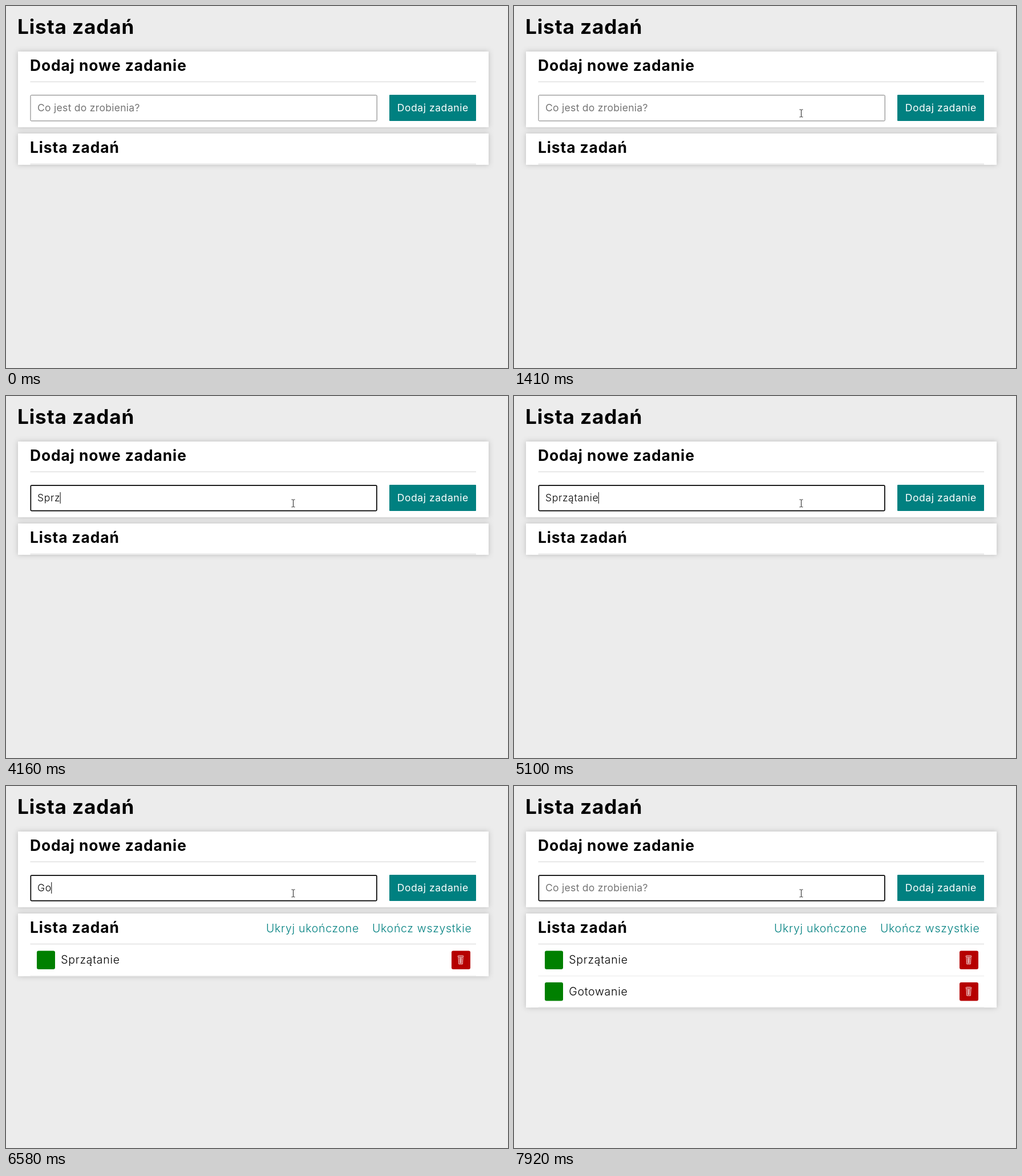
Recreate the animation shown at these times as an HTML page. Size 880 by 636 pixels, loop 8 s.

```html
<!DOCTYPE html>
<html lang="pl">
<head>
<meta charset="utf-8">
<title>Lista zadań</title>
<style>
html, body { margin: 0; width: 100%; height: 100%; overflow: hidden; background: #ececec; }
svg { display: block; width: 880px; height: 636px; }
text { font: 300 19.5px Montserrat, Inter, sans-serif; letter-spacing: .036em; white-space: pre; }
.h1 { font-size: 35.2px; font-weight: 700; letter-spacing: .024em; }
.h2 { font-size: 26.4px; font-weight: 700; letter-spacing: .034em; }
.field { font-size: 17.6px; }
.hint { fill: #757575; font-weight: 400; letter-spacing: .014em; }
.button { fill: #fff; font-weight: 400; letter-spacing: .03em; }
.link { fill: teal; }
.card { fill: #fff; filter: drop-shadow(0 0 5px #bbb); }
.rule { fill: #e9e9e9; }
</style>
</head>
<body>
<svg viewBox="0 0 880 636">
  <defs>
    <g id="row">
      <rect x="54" y="289.5" width="32" height="32.5" rx="3" fill="green"/>
      <rect x="781" y="289.5" width="33" height="32.5" rx="3" fill="#b60000"/>
      <g fill="none" stroke="#fff" stroke-width=".9">
        <rect x="792.2" y="298" width="9.6" height="2.4" rx="1.2"/>
        <path d="M793 300.5l.8 12.3h6.4l.8 -12.3M795.6 301.5l.3 10M797 301.5v10M798.4 301.5l-.3 10"/>
      </g>
    </g>
  </defs>

  <text class="h1" x="20" y="49">Lista zadań</text>

  <rect class="card" x="21" y="80" width="825" height="133"/>
  <rect id="listCard" class="card" x="21" y="224" width="825" height="55"/>

  <text class="h2" x="42" y="114">Dodaj nowe zadanie</text>
  <rect class="rule" x="42.5" y="132" width="781.5" height="2.2"/>
  <rect id="box" fill="#fff"/>
  <text id="typed" class="field" x="55" y="185"></text>
  <text id="hint" class="field hint" x="55" y="185">Co jest do zrobienia?</text>
  <rect id="caret" y="169" width="1" height="20"/>
  <rect x="672" y="156" width="152" height="46" rx="1" fill="teal"/>
  <text class="field button" x="685.7" y="185">Dodaj zadanie</text>

  <text class="h2" x="42" y="258">Lista zadań</text>
  <rect class="rule" x="42.5" y="276.5" width="781.5" height="2.2"/>
  <g id="first">
    <text class="link" x="456" y="256.5">Ukryj ukończone</text>
    <text class="link" x="642" y="256.5">Ukończ wszystkie</text>
    <use href="#row"/>
    <text x="96.3" y="312">Sprzątanie</text>
    <rect class="rule" x="42.5" y="333.3" width="781.5" height="1"/>
  </g>
  <g id="second">
    <use href="#row" y="55.5"/>
    <text x="96.3" y="367.5">Gotowanie</text>
    <rect class="rule" x="42.5" y="388.3" width="781.5" height="1"/>
  </g>

  <path id="arrow" d="M.5 .5v13.2l3 -2.8l2.2 4.8l2.1 -1l-2.2 -4.6h4.2z" fill="#fff" stroke="#000"/>
  <path id="beam" d="M-3 -6.5h2.2l.8 .8l.8 -.8h2.2M0 -6v12.5M-3 6.5h2.2l.8 -.8l.8 .8h2.2" fill="none" stroke="#222"/>
</svg>
<script>
const LOOP = 8000, FOCUS = 1760, ADD_1 = 5370, ADD_2 = 7570;
const MOVE = 370, OVER_FIELD = 1126, TICK = 68.75;

// time, x, y of the pointer
const path = [
  [370, 705, 517], [851, 602, 338], [920, 573, 321], [1057, 531, 230],
  [OVER_FIELD, 509.5, 165], [1401, 503.5, 188.5]
];

// time, field content
const typing = [
  [0, ''], [3700, 'S'], [3900, 'Sp'], [4030, 'Spr'], [4160, 'Sprz'], [4420, 'Sprzą'],
  [4690, 'Sprząt'], [4820, 'Sprząta'], [4970, 'Sprzątani'], [5100, 'Sprzątanie'], [ADD_1, ''],
  [6380, 'G'], ...[...'otowanie'].map((_, i) => [6580 + i * 790 / 7, 'Gotowanie'.slice(0, i + 2)]),
  [ADD_2, '']
];

// time, caret visibility
const blink = [
  [0, false], [FOCUS, true], [2290, false], [2820, true], [3370, false], [3700, true],
  [5630, false], [6160, true], [7920, false]
];

const el = id => document.getElementById(id);
const show = (id, on) => el(id).style.display = on ? '' : 'none';
const set = (id, attrs) => { for (const k in attrs) el(id).setAttribute(k, attrs[k]); };
const at = (steps, t) => steps.reduce((v, s) => t >= s[0] ? s[1] : v, steps[0][1]);

function pointer(t) {
  t = MOVE + Math.floor((t - MOVE) / TICK + 1e-6) * TICK;
  const i = path.findIndex(p => p[0] > t);
  if (i < 0) return path[path.length - 1].slice(1);
  const a = path[Math.max(0, i - 1)], b = path[i];
  const k = Math.max(0, (t - a[0]) / (b[0] - a[0] || 1));
  return [a[1] + (b[1] - a[1]) * k, a[2] + (b[2] - a[2]) * k];
}

function draw(t) {
  const text = at(typing, t), focused = t >= FOCUS;
  el('typed').textContent = text;
  show('hint', !text);
  show('caret', at(blink, t));
  set('caret', { x: 55.3 + (text ? el('typed').getComputedTextLength() - .8 : 0) });

  const w = focused ? 1.7 : 1;
  set('box', {
    x: 42.5 + w / 2, y: 156.2 + w / 2, width: 608.2 - w, height: 46.2 - w, rx: 1.5,
    stroke: focused ? '#000' : '#767676', 'stroke-width': w
  });

  show('first', t >= ADD_1);
  show('second', t >= ADD_2);
  set('listCard', { height: t >= ADD_2 ? 165.3 : t >= ADD_1 ? 110.3 : 55 });

  const [x, y] = pointer(t);
  show('arrow', t >= MOVE && t < OVER_FIELD);
  show('beam', t >= OVER_FIELD);
  for (const id of ['arrow', 'beam']) set(id, { transform: `translate(${x} ${y})` });
}

const start = performance.now();
function tick() {
  draw((performance.now() - start) % LOOP);
  requestAnimationFrame(tick);
}
tick();
</script>
</body>
</html>
```
